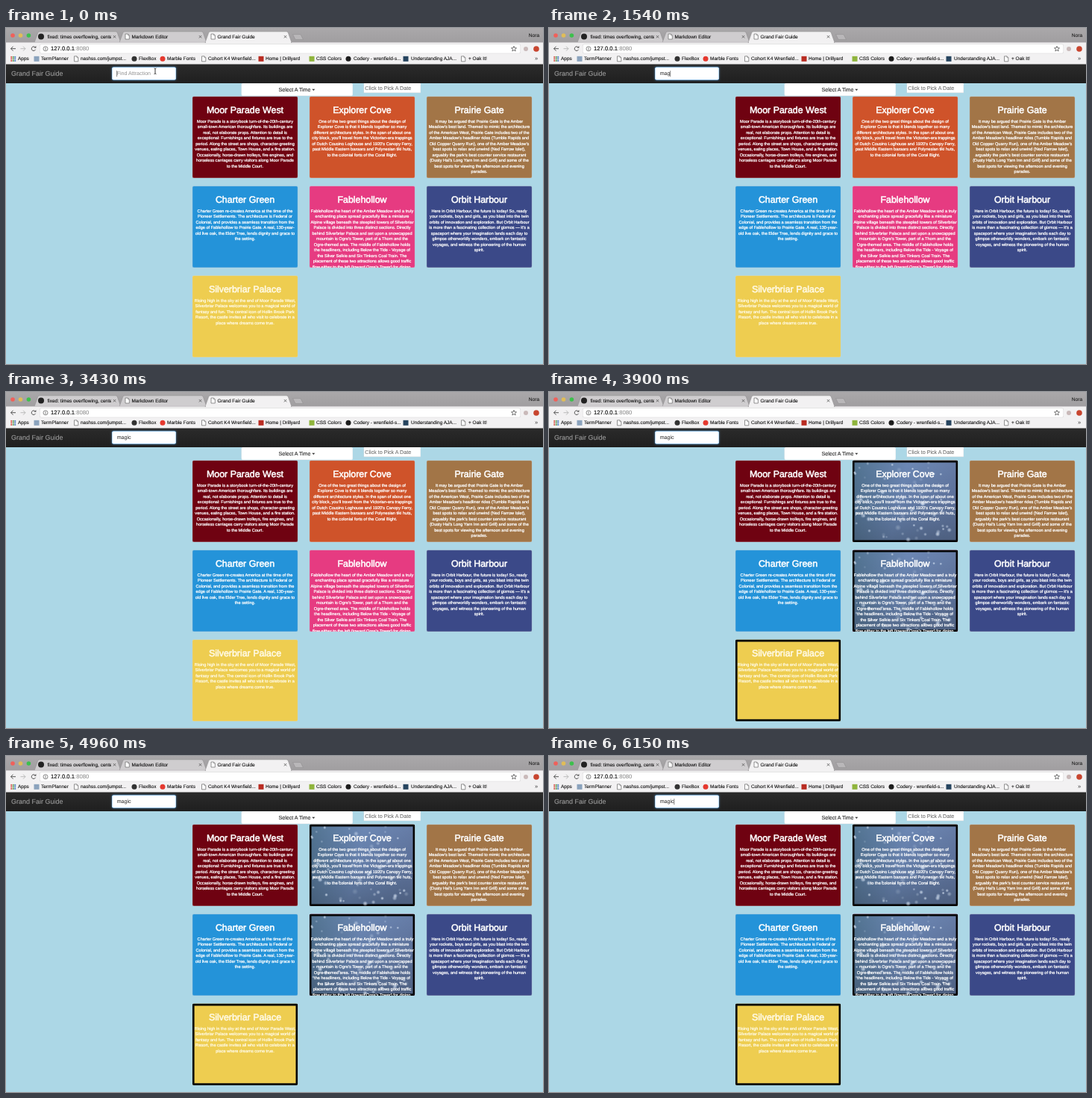
Recreate the animation shown at these times as an HTML page with a canvas. Size 720 px wide and 450 px high, loop 6270 ms.

```html
<!DOCTYPE html>
<html lang="en">
<head>
<meta charset="utf-8">
<title>Grand Fair Guide</title>
<style>
html, body { margin: 0; width: 100%; height: 100%; overflow: hidden; background: #acd7e6; }
canvas { display: block; width: 720px; height: 450px; }
</style>
</head>
<body>
<canvas id="stage" width="720" height="450"></canvas>
<script>
const ctx = document.getElementById('stage').getContext('2d');
const LOOP = 6270, STEP = LOOP / 53;
const SANS = '"Liberation Sans", Arial, sans-serif';
const MATCH_AT = 3660;
const KEYS = [[710, 'm'], [1180, 'ma'], [1420, 'mag'], [1660, 'magi'], [1770, 'magic']];

const cards = [
  { x: 250, y: 92, color: '#6f0211', title: 'Moor Parade West', lines: [
    'Moor Parade is a storybook turn-of-the-20th-century',
    'small-town American thoroughfare. Its buildings are',
    'real, not elaborate props. Attention to detail is',
    'exceptional: Furnishings and fixtures are true to the',
    'period. Along the street are shops, character-greeting',
    'venues, eating places, Town House, and a fire station.',
    'Occasionally, horse-drawn trolleys, fire engines, and',
    'horseless carriages carry visitors along Moor Parade',
    'to the Middle Court.'] },
  { x: 407, y: 92, color: '#cf532a', match: 'glitter', title: 'Explorer Cove', lines: [
    'One of the two great things about the design of',
    'Explorer Cove is that it blends together so many',
    'different architecture styles. In the span of about one',
    'city block, you\u2019ll travel from the Victorian-era trappings',
    'of Dutch Cousins Loghouse and 1920\u2019s Canopy Ferry,',
    'past Middle Eastern bazaars and Polynesian tiki huts,',
    'to the colonial forts of the Coral Bight.'] },
  { x: 564, y: 92, color: '#a27547', title: 'Prairie Gate', lines: [
    'It may be argued that Prairie Gate is the Amber',
    'Meadow\u2019s best land. Themed to mimic the architecture',
    'of the American West, Prairie Gate includes two of the',
    'Amber Meadow\u2019s headliner rides (Tumble Rapids and',
    'Old Copper Quarry Run), one of the Amber Meadow\u2019s',
    'best spots to relax and unwind (Ned Farrow Islet),',
    'arguably the park\u2019s best counter service restaurant',
    '(Dusty Hal\u2019s Long Yarn Inn and Grill) and some of the',
    'best spots for viewing the afternoon and evening',
    'parades.'] },
  { x: 250, y: 212, color: '#2493d9', title: 'Charter Green', lines: [
    'Charter Green re-creates America at the time of the',
    'Pioneer Settlements. The architecture is Federal or',
    'Colonial, and provides a seamless transition from the',
    'edge of Fablehollow to Prairie Gate. A real, 130-year-',
    'old live oak, the Elder Tree, lends dignity and grace to',
    'the setting.'] },
  { x: 407, y: 212, color: '#e63b81', match: 'glitter', title: 'Fablehollow', lines: [
    'Fablehollow the heart of the Amber Meadow and a truly',
    'enchanting place spread gracefully like a miniature',
    'Alpine village beneath the steepled towers of Silverbriar',
    'Palace is divided into three distinct sections. Directly',
    'behind Silverbriar Palace and set upon a snowcapped',
    'mountain is Ogre\u2019s Tower, part of a Thorn and the',
    'Ogre-themed area. The middle of Fablehollow holds',
    'the headliners, including Below the Tide - Voyage of',
    'the Silver Selkie and Six Tinkers Coal Train. The',
    'placement of these two attractions allows good traffic',
    'flow either to the left (toward Ogre\u2019s Tower) for dining,'] },
  { x: 564, y: 212, color: '#3b4988', title: 'Orbit Harbour', lines: [
    'Here in Orbit Harbour, the future is today! So, ready',
    'your rockets, boys and girls, as you blast into the twin',
    'orbits of innovation and exploration. But Orbit Harbour',
    'is more than a fascinating collection of gizmos \u2014 it\u2019s a',
    'spaceport where your imagination lands each day to',
    'glimpse otherworldly wonders, embark on fantastic',
    'voyages, and witness the pioneering of the human',
    'spirit.'] },
  { x: 250, y: 332, color: '#eecd50', match: 'border', title: 'Silverbriar Palace', lines: [
    'Rising high in the sky at the end of Moor Parade West,',
    'Silverbriar Palace welcomes you to a magical world of',
    'fantasy and fun. The central icon of Hollin Brook Park',
    'Resort, the castle invites all who visit to celebrate in a',
    'place where dreams come true.'] }
];

const bookmarks = [
  [41, 'box', '#8ba3bd', 'TermPlanner', 47],
  [94, 'page', '', 'nashss.com/jumpst...', 100],
  [172, 'dot', '#333', 'FlexBox', 178],
  [210, 'dot', '#e5392f', 'Marble Fonts', 216],
  [265, 'page', '', 'Cohort K4 Wrenfield...', 271],
  [342, 'box', '#b92c22', 'Home | Drillyard', 348],
  [410, 'box', '#8fb43c', 'CSS Colors', 416],
  [459, 'dot', '#1c1c1c', 'Codery - wrenfield-s...', 466],
  [536, 'box', '#26445f', 'Understanding AJA...', 543],
  [613, 'page', '', '+ Oak It!', 620]
];

function box(x, y, w, h, fill, r = 0) {
  ctx.fillStyle = fill;
  ctx.beginPath();
  ctx.roundRect(x, y, w, h, r);
  ctx.fill();
}

function dot(x, y, r, fill) {
  ctx.fillStyle = fill;
  ctx.beginPath();
  ctx.arc(x, y, r, 0, Math.PI * 2);
  ctx.fill();
}

function path(points, color, width = 1, fill) {
  ctx.beginPath();
  points.forEach(([x, y], i) => i ? ctx.lineTo(x, y) : ctx.moveTo(x, y));
  if (fill) {
    ctx.closePath();
    ctx.fillStyle = fill;
    ctx.fill();
  }
  if (color) {
    ctx.strokeStyle = color;
    ctx.lineWidth = width;
    ctx.stroke();
  }
}

function text(str, x, y, size, color, { align = 'left', weight = 400, heft = 0 } = {}) {
  ctx.font = `${weight} ${size}px ${SANS}`;
  ctx.textAlign = align;
  ctx.textBaseline = 'middle';
  ctx.fillStyle = color;
  ctx.fillText(str, x, y);
  if (heft) {
    ctx.strokeStyle = color;
    ctx.lineWidth = heft;
    ctx.lineJoin = 'round';
    ctx.strokeText(str, x, y);
  }
}

function gradient(x0, y0, x1, y1, colors) {
  const g = ctx.createLinearGradient(x0, y0, x1, y1);
  colors.forEach((c, i) => g.addColorStop(i / (colors.length - 1), c));
  return g;
}

function pageIcon(x, y) {
  path([[x - 2.5, y - 3.5], [x + 1, y - 3.5], [x + 2.8, y - 1.6], [x + 2.8, y + 3.5],
    [x - 2.5, y + 3.5], [x - 2.5, y - 3.5]], '#777', 0.8, '#fff');
  path([[x + 1, y - 3.5], [x + 1, y - 1.6], [x + 2.8, y - 1.6]], '#777', 0.6);
}

function cross(x, y) {
  path([[x - 1.7, y - 1.7], [x + 1.7, y + 1.7]], '#555', 0.8);
  path([[x + 1.7, y - 1.7], [x - 1.7, y + 1.7]], '#555', 0.8);
}

function tab(x, w, fill, title, icon, clip) {
  path([[x, 19.5], [x + 5, 5.5], [x + 7, 4.8], [x + w - 7, 4.8], [x + w - 5, 5.5], [x + w, 19.5]],
    '#8f8d8f', 0.6, fill);
  const left = x + 9;
  if (icon === 'page') pageIcon(left + 1.5, 11.5);
  else dot(left, 11.5, 4, '#222');
  ctx.save();
  ctx.beginPath();
  ctx.rect(x, 4, clip - x, 16);
  ctx.clip();
  text(title, icon === 'page' ? left + 7.5 : left + 8.5, 11.8, 6.5, '#111', { heft: 0.12 });
  ctx.restore();
  cross(x + w - 8.5, 11.7);
}

function drawBrowser() {
  box(0, 0, 720, 20, gradient(0, 0, 0, 20, ['#aaa8aa', '#a09ea0']));
  dot(9, 10, 2.8, '#f0605a');
  dot(19.5, 10, 2.8, '#e0bd58');
  dot(30.4, 10, 2.8, '#3cc04c');
  tab(38, 116, '#cfcdcf', 'fixed: times overflowing, center', 'dot', 141);
  tab(152, 117, '#cfcdcf', 'Markdown Editor', 'page', 255);
  box(0, 19, 720, 30, '#f2f1f2');
  path([[0, 19.3], [720, 19.3]], '#a9a7a9', 0.6);
  tab(267, 116, '#f2f1f2', 'Grand Fair Guide', 'page', 370);
  box(268, 19, 114, 1.2, '#f2f1f2');
  path([[384.5, 8.6], [395, 8.6], [398.5, 15.4], [388, 15.4], [384.5, 8.6]], '#908e90', 0.6, '#b9b7b9');
  text('Nora', 708, 9.7, 6.6, '#222', { align: 'center', heft: 0.1 });

  path([[13, 27.7], [6.5, 27.7]], '#555', 1);
  path([[9.5, 24.7], [6.5, 27.7], [9.5, 30.7]], '#555', 1);
  path([[19.5, 27.7], [26, 27.7]], '#bbb', 1);
  path([[23, 24.7], [26, 27.7], [23, 30.7]], '#bbb', 1);
  ctx.strokeStyle = '#555';
  ctx.lineWidth = 1;
  ctx.beginPath();
  ctx.arc(37, 27.7, 2.8, 0.4, 5.5);
  ctx.stroke();
  path([[37.6, 26.8], [40.4, 26.8], [40.4, 24]], null, 0, '#555');

  box(45, 21.6, 645, 12.6, '#d6d5d6', 2);
  box(45.5, 22.1, 644, 11.6, '#fff', 1.6);
  ctx.lineWidth = 0.7;
  ctx.beginPath();
  ctx.arc(53, 27.8, 3, 0, Math.PI * 2);
  ctx.stroke();
  path([[53, 27.2], [53, 29.6]], '#555', 0.8);
  dot(53, 26.2, 0.5, '#555');
  text('127.0.0.1', 60, 28, 7.7, '#111', { heft: 0.15 });
  text(':8080', 60 + ctx.measureText('127.0.0.1').width, 28, 7.7, '#808080');
  const star = Array.from({ length: 11 }, (_, i) => {
    const a = i * Math.PI / 5 - Math.PI / 2, r = i % 2 ? 1.6 : 3.7;
    return [681 + r * Math.cos(a), 28 + r * Math.sin(a)];
  });
  path(star, '#555', 0.8);
  dot(697, 28, 3, '#c9b9b9');
  dot(711, 28, 3.8, '#c8452f');

  for (let i = 0; i < 9; i++)
    box(6.3 + i % 3 * 2.5, 37.9 + Math.floor(i / 3) * 2.5, 1.9, 1.9, ['#d8554b', '#5b9b57', '#4f7fc6'][i % 3]);
  text('Apps', 16, 41.6, 6.5, '#111', { heft: 0.12 });
  for (const [x, kind, color, label, tx] of bookmarks) {
    if (kind === 'page') pageIcon(x, 41.3);
    else if (kind === 'dot') dot(x, 41.3, 3.5, color);
    else box(x - 3.5, 37.8, 7, 7, color);
    text(label, tx, 41.6, 6.5, '#111', { heft: 0.12 });
  }
  text('\u00bb', 709, 41, 7.5, '#333');
}

function drawNav(t) {
  box(0, 48.6, 720, 25.4, gradient(0, 48, 0, 74, ['#2b2b2b', '#1f1f1f']));
  text('Grand Fair Guide', 7, 61.3, 9, '#9d9d9d', { heft: 0.1 });

  ctx.save();
  ctx.shadowColor = 'rgba(102,175,233,.6)';
  ctx.shadowBlur = 3;
  box(142, 52.3, 86, 17.4, '#66afe9', 2);
  ctx.restore();
  box(142.4, 52.7, 85.2, 16.6, '#fff', 1.8);

  const key = KEYS.filter(k => t >= k[0]).pop();
  const typed = key ? key[1] : '';
  if (typed) text(typed, 148.7, 61.3, 7.1, '#444', { heft: 0.1 });
  else text('Find Attraction', 148.7, 61.3, 7.1, '#8f8f8f');
  if (t < 1915 || (t - 1915) % 1000 < 500) {
    const x = 148.6 + (typed ? ctx.measureText(typed).width + 0.3 : 0);
    path([[x, 57.2], [x, 65.3]], '#333', 0.6);
  }
  if (typed === 'm' || typed === 'ma') {
    box(142, 70, 86, 12.3, '#fff');
    text('Moor', 146.5, 76.4, 7, '#111', { weight: 700 });
  }
  if (!typed) {
    path([[198.5, 53.8], [200, 54.6], [201.5, 53.8]], '#222', 0.8);
    path([[200, 54.6], [200, 61]], '#222', 0.9);
    path([[198.5, 61.8], [200, 61], [201.5, 61.8]], '#222', 0.8);
  }

  box(315.5, 74, 149.5, 17, '#dbe2e5', 2);
  box(315.9, 74.2, 148.7, 16.4, '#fff', 1.6);
  text('Select A Time', 365.5, 82.7, 7.1, '#333', { heft: 0.15 });
  path([[410.3, 81.8], [414.3, 81.8], [412.3, 84]], null, 0, '#333');
  box(479.5, 74, 76.5, 13, '#cdd5d9');
  box(480, 74, 75.7, 12.6, '#fff');
  text('Click to Pick A Date', 481.3, 80.6, 7.15, '#707070', { heft: 0.1 });
}

// A soft blue picture with sparkles that twinkle in place.
function glitter(x, y, w, h, step) {
  box(x, y, w, h, gradient(x, y, x + w, y + h * 0.3, ['#4a6c89', '#6782b0', '#5f749f']));
  box(x, y, w, h, gradient(x, y, x, y + h,
    ['rgba(150,180,215,.12)', 'rgba(60,75,90,.08)', 'rgba(45,58,70,.35)']));
  let seed = 77;
  const rnd = () => (seed = seed * 16807 % 2147483647) / 2147483647;
  for (let i = 0; i < 75; i++) {
    const px = x + rnd() * w, py = y + rnd() * h;
    const r = 0.9 + rnd() * rnd() * 1.4;
    const phase = rnd() + step / 10;
    ctx.globalAlpha = 0.4 + 0.25 * Math.sin(phase * Math.PI * 2);
    const glow = ctx.createRadialGradient(px, py, 0, px, py, r * 2);
    glow.addColorStop(0, '#fff');
    glow.addColorStop(0.4, 'rgba(225,238,255,.8)');
    glow.addColorStop(1, 'rgba(190,215,245,0)');
    dot(px, py, r * 2, glow);
  }
  ctx.globalAlpha = 1;
}

function drawCard(card, t, step) {
  const { x, y, color } = card;
  const [px, py, w, h] = [x - 0.2, y - 0.4, 141.5, 109.4];
  const mid = x + 70.5;
  const lit = card.match && t >= MATCH_AT;
  ctx.save();
  ctx.beginPath();
  ctx.roundRect(px, py, w, h, 2.2);
  ctx.clip();
  box(px, py, w, h, color);
  if (lit) {
    box(px, py, w, h, '#050505');
    const inner = [px + 2.8, py + 2.8, w - 5.6, h - 5.6];
    if (card.match === 'glitter') glitter(...inner, step);
    else box(...inner, color);
  } else {
    ctx.strokeStyle = 'rgba(221,221,221,.5)';
    ctx.lineWidth = 1;
    ctx.beginPath();
    ctx.roundRect(px, py, w, h, 2.2);
    ctx.stroke();
  }
  const ink = card.match === 'border' ? '#fffae6' : '#fff';
  text(card.title, mid, y + 18.9, 12.4, ink, { align: 'center', heft: 0.55 });
  card.lines.forEach((line, i) =>
    text(line, mid, y + 33.1 + i * 7.5, 5.62, ink, { align: 'center', heft: 0.24 }));
  ctx.restore();
}

const start = performance.now();
let last = -1;

function frame() {
  const now = (performance.now() - start) % LOOP;
  const step = Math.min(52, Math.floor((now + 6) / STEP));
  if (step !== last) {
    last = step;
    const t = step * STEP + 2;
    ctx.textRendering = 'geometricPrecision';
    box(0, 0, 720, 450, '#acd7e6');
    drawBrowser();
    cards.forEach(card => drawCard(card, t, step));
    drawNav(t);
  }
  requestAnimationFrame(frame);
}
frame();
</script>
</body>
</html>
```
